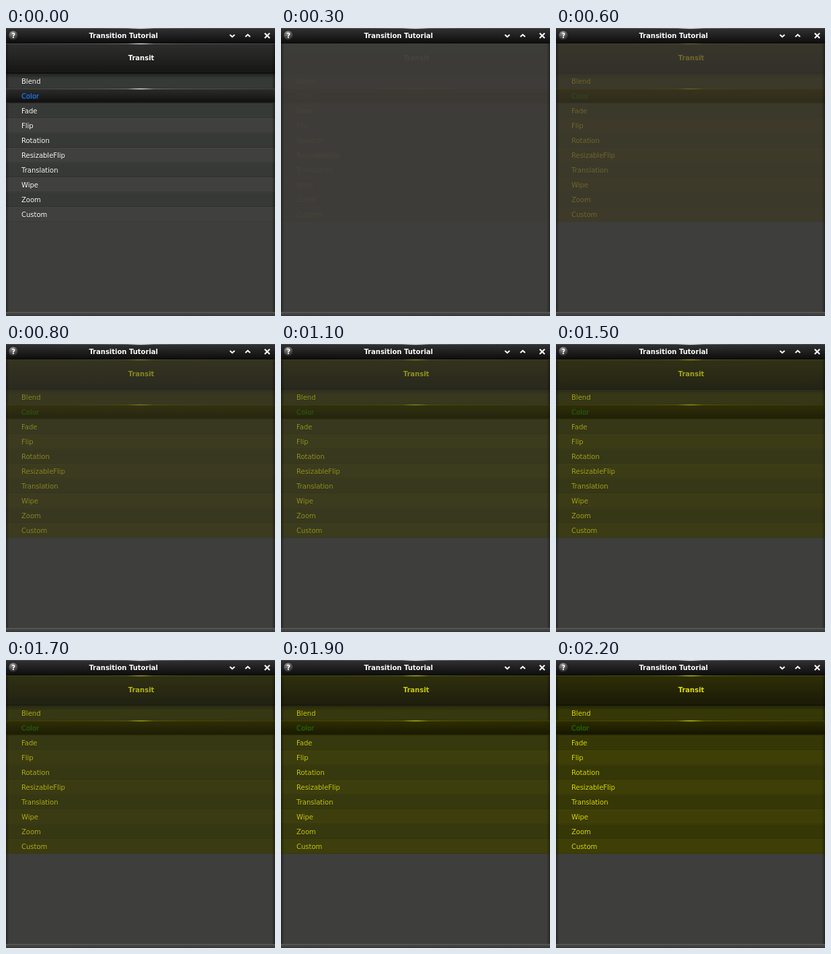
Recreate the animation shown at these times as an HTML page. Size 400x428 px, loop 2500 ms.

```html
<!DOCTYPE html>
<html lang="en">
<head>
<meta charset="utf-8">
<title>Transition Tutorial</title>
<style>
html, body { margin: 0; width: 100%; height: 100%; overflow: hidden; background: #3e3e3c; }
svg { display: block; }
text { font: 10px "DejaVu Sans", Verdana, sans-serif; fill: #fff; }
.bold { font-weight: bold; text-anchor: middle; }
.layer { isolation: isolate; }
.tint { mix-blend-mode: multiply; }
</style>
</head>
<body>
<svg id="stage" width="400" height="428" viewBox="0 0 400 428">
  <defs>
    <linearGradient id="bar" x2="0" y2="1">
      <stop stop-color="#323232"/><stop offset=".5" stop-color="#1f1f1f"/><stop offset="1" stop-color="#0c0c0c"/>
    </linearGradient>
    <linearGradient id="pickBar" x2="0" y2="1">
      <stop stop-color="#2c2c2b"/><stop offset=".5" stop-color="#1e1e1d"/>
      <stop offset=".88" stop-color="#111"/><stop offset="1" stop-color="#282927"/>
    </linearGradient>
    <linearGradient id="head" x2="0" y2="1">
      <stop stop-color="#2e2e2d"/><stop offset=".5" stop-color="#222221"/><stop offset=".9" stop-color="#171717"/><stop offset="1" stop-color="#1c1c1b"/>
    </linearGradient>
    <linearGradient id="drop" x2="0" y2="1">
      <stop stop-color="#000" stop-opacity=".5"/><stop offset="1" stop-color="#000" stop-opacity="0"/>
    </linearGradient>
    <linearGradient id="shine">
      <stop stop-color="#464645"/><stop offset=".35" stop-color="#5c5c5a"/><stop offset=".45" stop-color="#747472"/>
      <stop offset=".5" stop-color="#e4e4e4"/>
      <stop offset=".55" stop-color="#747472"/><stop offset=".65" stop-color="#5c5c5a"/><stop offset="1" stop-color="#464645"/>
    </linearGradient>
    <linearGradient id="edge">
      <stop stop-color="#000" stop-opacity=".4"/><stop offset=".012" stop-color="#000" stop-opacity="0"/>
      <stop offset=".988" stop-color="#000" stop-opacity="0"/><stop offset="1" stop-color="#000" stop-opacity=".4"/>
    </linearGradient>
    <linearGradient id="foot" x2="0" y2="1">
      <stop stop-color="#4c4c4a"/><stop offset="1" stop-color="#343433"/>
    </linearGradient>
    <radialGradient id="glow">
      <stop stop-color="#fff" stop-opacity=".3"/><stop offset="1" stop-color="#fff" stop-opacity="0"/>
    </radialGradient>
    <radialGradient id="ball" cx=".4" cy=".25" r=".8">
      <stop stop-color="#a0a0a0"/><stop offset=".5" stop-color="#555"/><stop offset="1" stop-color="#181818"/>
    </radialGradient>
  </defs>
  <rect width="400" height="428" fill="#3e3e3c"/>
  <rect y="23" width="400" height="405" fill="url(#edge)"/>
  <rect y="422" width="400" height="1" fill="#5c5c5a"/>
  <rect y="423" width="400" height="5" fill="url(#foot)"/>
  <g id="titlebar"></g>
  <g id="list" class="layer"></g>
  <g id="pick" class="layer"></g>
</svg>
<script>
const LOOP = 2500, STEP = 100, START = 300, END = 2200;
const TOP = 68, ROW = 22, PICKED = 1;
const ITEMS = ["Blend", "Color", "Fade", "Flip", "Rotation", "ResizableFlip",
               "Translation", "Wipe", "Zoom", "Custom"];
// time, opacity, red, green
const STOPS = [
  [300, .05, 1, .65], [800, .45, .9, .88], [1300, .55, .9, .89],
  [1700, .68, .92, .92], [1900, .78, .95, .96], [2200, .88, .97, .97]
];
const $ = id => document.getElementById(id);

function add(parent, tag, attrs, content = "") {
  const el = document.createElementNS("http://www.w3.org/2000/svg", tag);
  for (const key in attrs) el.setAttribute(key, attrs[key]);
  el.textContent = content;
  parent.append(el);
  return el;
}
const rect = (g, x, y, width, height, fill, more) =>
  add(g, "rect", { x, y, width, height, fill, ...more });

function label(g, x, y, str, attrs = {}) {
  add(g, "text", { ...attrs, x, y: y + 1, style: "fill:#000;opacity:.5" }, str);
  add(g, "text", { ...attrs, x, y }, str);
}
function shine(g, y) {
  rect(g, 0, y, 400, 1, "url(#shine)");
  add(g, "ellipse", { cx: 200, cy: y + .5, rx: 20, ry: 2, fill: "url(#glow)" });
}

function buildTitlebar(g) {
  rect(g, 0, 0, 400, 23, "url(#bar)");
  shine(g, 0);
  rect(g, 0, 22, 400, 1, "#0a0a0a");
  add(g, "circle", { cx: 11, cy: 11, r: 7.3, fill: "url(#ball)", stroke: "#111", "stroke-width": .6 });
  add(g, "text", { x: 11.2, y: 15, class: "bold" }, "?");
  label(g, 174.7, 15, "Transition Tutorial", { class: "bold" });
  const icons = ["M333 10l3.5 3.2l3.5-3.2", "M356 13l3.5-3.2l3.5 3.2", "M384.7 7.7l7.4 7.4m0-7.4l-7.4 7.4"];
  for (const d of icons)
    add(g, "path", { d, fill: "none", stroke: "#fff", "stroke-width": 2.1 });
}

function buildList(g) {
  const bottom = TOP + ITEMS.length * ROW;
  rect(g, 0, 23, 400, bottom - 23, "#3e3e3c");
  rect(g, 0, 23, 400, TOP - 23, "url(#head)");
  shine(g, 23);
  label(g, 201, 48, "Transit", { class: "bold" });
  ITEMS.forEach((name, i) => {
    const y = TOP + i * ROW;
    rect(g, 0, y, 400, ROW, i % 2 ? "#40403e" : "#373936");
    rect(g, 0, y, 400, 1, "#fff", { opacity: .025 });
    rect(g, 0, y + ROW - 1, 400, 1, "#000", { opacity: .12 });
    if (i !== PICKED) label(g, 23, y + 15, name);
  });
  rect(g, 0, TOP - 2, 400, 9, "url(#drop)");
  rect(g, 0, 24, 400, bottom - 24, "url(#edge)");
  rect(g, 0, 23, 400, bottom - 23, "#fff", { class: "tint" });
}

function buildPick(g) {
  const y = TOP + PICKED * ROW;
  rect(g, 0, y, 400, ROW, "url(#pickBar)");
  shine(g, y);
  label(g, 23, y + 15, ITEMS[PICKED], { style: "fill:#2f82ee;text-shadow:0 0 3px #1450a0" });
  rect(g, 0, y, 400, ROW, "#fff", { class: "tint" });
}

function stateAt(t) {
  if (t < START) return [1, 1, 1, 1];
  t = Math.min(END, Math.floor(t / STEP) * STEP);
  const i = Math.max(1, STOPS.findIndex(s => s[0] >= t));
  const a = STOPS[i - 1], b = STOPS[i], k = (t - a[0]) / (b[0] - a[0]);
  const [, alpha, red, green] = a.map((v, n) => v + (b[n] - v) * k);
  return [alpha, red, green, 0];
}

buildTitlebar($("titlebar"));
buildList($("list"));
buildPick($("pick"));

const layers = document.querySelectorAll(".layer");
const tints = document.querySelectorAll(".tint");
const origin = performance.now();

function draw(now) {
  const [alpha, ...rgb] = stateAt(Math.max(0, now - origin) % LOOP);
  const color = `rgb(${rgb.map(c => Math.round(c * 255))})`;
  layers.forEach(el => el.style.opacity = alpha);
  tints.forEach(el => el.style.fill = color);
  requestAnimationFrame(draw);
}
draw(origin);
</script>
</body>
</html>
```
